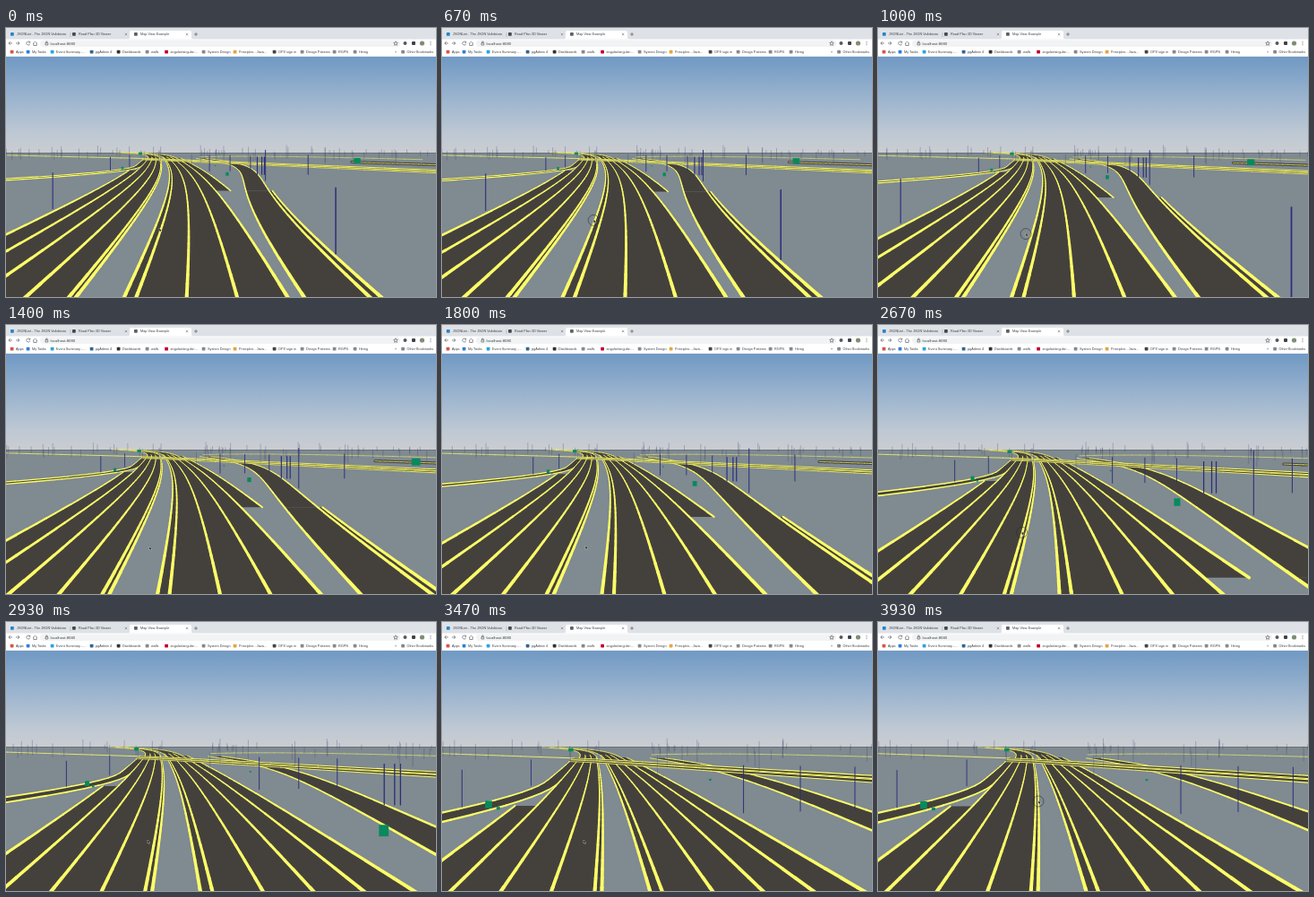
Write an HTML page with a canvas that moves like this. It is 480x300 px and loops after 3.99 s.

```html
<!DOCTYPE html>
<html lang="en">
<head>
<meta charset="utf-8">
<title>Map View Example</title>
<style>
  html, body { margin: 0; width: 100%; height: 100%; overflow: hidden; background: #7f8a91; }
  canvas, svg { position: absolute; left: 0; top: 0; display: block; }
  text { font: 3.8px "Liberation Sans", Arial, sans-serif; fill: #3c4043; }
</style>
</head>
<body>
<canvas id="view" width="480" height="300"></canvas>
<svg id="bar" width="480" height="32" viewBox="0 0 480 32">
  <rect width="480" height="32" fill="#fff"/>
  <rect width="480" height="12.5" fill="#dee1e6"/>
  <path d="M136 12.5q2 0 2-2V5q0-2 2-2h65q2 0 2 2v5.500q0 2 2 2z" fill="#fff"/>
  <path d="M72 5v5" stroke="#9a9da1" stroke-width=".5"/>
  <rect x="38" y="13.500" width="402" height="7.500" rx="3.700" fill="#f1f3f4"/>
  <g fill="none" stroke="#5f6368" stroke-width=".7">
    <path d="M7 17H3m1.800-1.800L3 17l1.800 1.800M11 17h4m-1.800-1.800L15 17l-1.800 1.800M30 17.500l2.500-2.300 2.500 2.300m-4.200-.4v2.400h3.400v-2.400"/>
    <path d="M26.600 16a2 2 0 1 0 .2 1.600m0-2.900v1.500h-1.500"/>
    <path d="M212 5v4m-2-2h4M44 16.700h2.800v2.300H44zm.6 0v-1a.8.8 0 0 1 1.600 0v1"/>
    <path d="M435 14.800l.7 1.500 1.600.2-1.200 1.100.3 1.700-1.400-.8-1.400.8.3-1.700-1.200-1.100 1.600-.2z"/>
  </g>
  <circle cx="445.500" cy="17" r="2" fill="#55595e"/>
  <rect x="453" y="15" width="4" height="4" rx="1" fill="#3f4347"/>
  <circle cx="464.500" cy="17" r="2.600" fill="#7d8f74"/>
  <g fill="#5f6368"><circle cx="474" cy="15.300" r=".5"/><circle cx="474" cy="17" r=".5"/><circle cx="474" cy="18.700" r=".5"/></g>
  <path d="M0 31.700h480" stroke="#d5d7da" stroke-width=".5"/>
</svg>
<script>
const W = 480, H = 300, LOOP = 3990;
const VX = 170, VY = 132, GROUND = 139;
const LANE = 335, MEDIAN = 320, GORE_LEFT = 37.3, GORE_RIGHT = 20.2;
const YELLOW = '#fdfd68', ROAD = '#44413d';
const ctx = document.getElementById('view').getContext('2d');

// ---- browser bar
const svg = document.getElementById('bar');
function add(tag, attrs, text) {
  const el = document.createElementNS('http://www.w3.org/2000/svg', tag);
  for (const k in attrs) el.setAttribute(k, attrs[k]);
  if (text) el.textContent = text;
  svg.append(el);
}
function icon(x, y, color) {
  add('rect', { x, y: y - 2, width: 3.8, height: 3.8, rx: .8, fill: color });
}
[['JSONLint - The JSON Validator', 12, '#2585c7'],
 ['Road Plan 3D Viewer', 81, '#44494f'],
 ['Map View Example', 150, '#5b6167']].forEach(([label, x, color], i) => {
  icon(x - 7, 7, color);
  add('text', { x, y: 8.4 }, label);
  add('path', { d: `M${64.8 + 68 * i} 5.800l2.400 2.400m0-2.400l-2.400 2.400`, stroke: '#5f6368', 'stroke-width': .5 });
});
add('text', { x: 49.5, y: 18.5, style: 'font-size:4.300px' }, 'localhost:8080');
const FOLDER = '#85898e';
[[11, 'Apps', '#d9534a'], [29, 'My Tasks', '#2f7de1'], [56, 'Event Summary -...', '#2aa3e0'],
 [100, 'pgAdmin 4', '#33678f'], [130, 'Dashboards', '#333'], [162, 'walls', FOLDER],
 [183.5, 'angular/angular:...', '#c3002f'], [225, 'System Design', FOLDER], [260, 'Principles - Java...', '#e8a33d'],
 [304, 'OPX sign in', '#444'], [335, 'Design Patterns', FOLDER], [371, 'RGPN', FOLDER],
 [394, 'Hiring', FOLDER], [447.5, 'Other Bookmarks', FOLDER]].forEach(([x, label, color]) => {
  icon(x - 6.3, 26.8, color);
  add('text', { x, y: 28.2 }, label);
});
add('text', { x: 434, y: 28.2 }, '»');

// ---- motion: two drags, each easing to rest
const ease = u => (u = Math.min(1, Math.max(0, u)), u * u * (3 - 2 * u));
const travel = t => 8 * ease((t - 490) / 1320) + 15.7 * ease((t - 2090) / 1450);
const pressed = t => (t >= 530 && t < 1330) || (t >= 2130 && t < 2800) || t >= 3730;

const path = [[0, 171, 224], [530, 171, 208], [1400, 160, 248], [1870, 160, 247],
  [2130, 166, 205], [2930, 158, 244], [3470, 158, 244], [3800, 179, 200]];
function pointer(t) {
  const i = Math.max(1, path.findIndex(p => p[0] > t));
  const [a, b] = t >= 3800 ? [path[7], path[7]] : [path[i - 1], path[i]];
  const u = a === b ? 0 : (t - a[0]) / (b[0] - a[0]);
  return [a[1] + (b[1] - a[1]) * u, a[2] + (b[2] - a[2]) * u];
}

// ---- world: sideways position as a function of depth
const spine = d => 180 - (d < 60 ? .0046 : .009) * Math.abs(60 - d) ** 3;
const left = k => d => spine(d) - k * LANE;
const right = k => d => spine(d) + MEDIAN + 80 + k * LANE;
const median = d => spine(d) + MEDIAN;

const slipTop = d => left(4)(d) - 5.6 * Math.max(0, 46 - d) ** 2.2;
const slipLow = d => slipTop(d + 1) + 330;

const rampL = d => 2300 + 1650 * Math.sin(.052 * (d - 24));
const rampR = d => rampL(d) + 400 + 6 * d;
const shoulder = d => rampR(d) + 75;

// Strips that run across the view: depth as a function of sideways position.
const bridge = drop => x => 72 - drop - x * (x > 0 ? .0029 : .0017);
const loopRoad = x => 90 - ((x - 8700) / 2400) ** 2;
const spur = x => 57 - (x - 12300) * .003;

let seed = 11;
const rand = () => (seed = (seed * 16807) % 2147483647) / 2147483647;

// depth, sideways, height, weight
const poles = [[8.3, 1644, 620, 1], [14.3, -1685, 580, .7], [26, 3110, 900, .6], [31.6, 5285, 700, .6],
  [35.9, 2050, 660, .5], [36.2, 2900, 640, .5], [36.5, 3755, 620, .5], [37, -1980, 560, .5], [43.3, -1390, 580, .4]];
for (const side of [3480, 3640, 3730]) poles.push([31.5, side, 640, 1]);
for (let i = 0; i < 85; i++) {
  const d = 50 + 75 * rand();
  poles.push([d, (rand() * 580 - 220) * d * .95, 500 + 620 * rand() ** 2, 0]);
}
// depth, sideways, drop below eye, width, height
const signs = [[25.5, 1963, 785, 84, 100], [35.7, -1428, 865, 92, 100], [27, 5994, 432, 200, 165],
  [100, -2000, 800, 420, 280], [46.4, 2951, 1000, 60, 50], [36, -1330, 940, 50, 40]];

// ---- drawing
let S = 0;
const project = ([d, x]) => [VX + x / (d - S), VY + 1000 / (d - S)];

function along(f, from, to) {
  const pts = [], near = Math.max(from - S, 5.3), far = to - S;
  if (far <= near) return pts;
  const n = Math.max(2, Math.ceil(Math.log(far / near) / .07));
  for (let i = 0; i <= n; i++) {
    const d = S + near * (far / near) ** (i / n);
    pts.push(project([d, f(d)]));
  }
  return pts;
}
function across(f, from, to) {
  const pts = [];
  for (let i = 0; i <= 24; i++) {
    const x = from + (to - from) * i / 24, d = f(x);
    if (d - S > 1) pts.push(project([d, x]));
  }
  return pts;
}
function fill(a, b) {
  ctx.fillStyle = ROAD;
  ctx.beginPath();
  [...a, ...b.reverse()].forEach(p => ctx.lineTo(p[0], p[1]));
  ctx.fill();
}
function stripe(pts, base = .4, grow = .022, color = YELLOW) {
  ctx.strokeStyle = color;
  for (let i = 1; i < pts.length; i++) {
    const [x0, y0] = pts[i - 1], [x1, y1] = pts[i];
    ctx.lineWidth = base + grow * Math.max(0, (y0 + y1) / 2 - VY);
    ctx.beginPath();
    ctx.moveTo(x0, y0);
    ctx.lineTo(x1, y1);
    ctx.stroke();
  }
}
const surface = (a, b, from, to) => fill(along(a, from, to), along(b, from, to));
const line = (f, from, to) => stripe(along(f, from, to));

const sky = ctx.createLinearGradient(0, 32, 0, GROUND);
sky.addColorStop(0, '#7099c4');
sky.addColorStop(.45, '#9db5cf');
sky.addColorStop(.8, '#bec8d3');
sky.addColorStop(1, '#cacdd2');

function roads() {
  stripe(across(loopRoad, 4000, 20000), .2);
  stripe(across(spur, 12300, 16200), 2, .05, ROAD);
  stripe(across(spur, 12300, 16200), .2);

  surface(slipTop, slipLow, 21, 76);
  line(slipTop, 21, 76);
  line(slipLow, 21, 46);

  surface(rampL, shoulder, 0, GORE_RIGHT);
  surface(rampL, rampR, GORE_RIGHT, 74);
  line(rampL, 0, 74);
  line(rampR, 0, 74);
  line(shoulder, 0, GORE_RIGHT);

  surface(left(3), spine, 0, 150);
  surface(left(4), left(3), 0, GORE_LEFT);
  for (let k = 0; k < 4; k++) line(left(k), 0, k % 3 ? 85 : 150);
  line(left(4), 0, GORE_LEFT);
  line(left(.14), 0, 75);

  surface(median, right(3), 0, 150);
  surface(right(3), right(4), GORE_RIGHT, 76);
  line(median, 0, 150);
  for (let k = 0; k < 4; k++) line(right(k), 0, k < 3 ? 85 : 150);
  line(right(4), GORE_RIGHT, 76);

  fill(across(bridge(0), -1200, 16000), across(bridge(8), -1200, 16000));
  stripe(across(bridge(0), -17000, 16000), .5, .018);
  for (const drop of [3.6, 4.8, 8]) stripe(across(bridge(drop), -1200, 16000), .25, .02);
}

function posts() {
  for (const [d, side, h, weight] of poles) {
    const z = d - S;
    if (z < 4) continue;
    const [x, y] = project([d, side]);
    ctx.strokeStyle = weight ? '#2c2d78' : 'rgba(62,66,104,.5)';
    ctx.lineWidth = .6 + weight * (.4 + 4 / z);
    ctx.beginPath();
    ctx.moveTo(x, y);
    ctx.lineTo(x, y - h / z);
    ctx.stroke();
  }
  ctx.fillStyle = '#078a5e';
  for (const [d, x, drop, w, h] of signs) {
    const z = d - S;
    if (z > 4) ctx.fillRect(VX + (x - w / 2) / z, VY + (drop - h / 2) / z, w / z, h / z);
  }
}

const arrow = new Path2D('M0-1V3L.9 2.200 1.600 3.600 2.200 3.200 1.600 2 2.800 1.900z');
function cursor(t) {
  ctx.save();
  ctx.translate(...pointer(t));
  if (pressed(t)) {
    ctx.strokeStyle = 'rgba(38,38,40,.6)';
    ctx.lineWidth = .9;
    ctx.beginPath();
    ctx.arc(0, 0, 6, 0, 7);
    ctx.stroke();
  }
  ctx.fillStyle = '#111';
  ctx.strokeStyle = '#ddd';
  ctx.lineWidth = .4;
  ctx.fill(arrow);
  ctx.stroke(arrow);
  ctx.restore();
}

function draw(t) {
  S = travel(t);
  ctx.fillStyle = sky;
  ctx.fillRect(0, 0, W, GROUND);
  ctx.fillStyle = '#7f8a91';
  ctx.fillRect(0, GROUND, W, H - GROUND);
  ctx.fillStyle = 'rgba(70,78,84,.45)';
  ctx.fillRect(0, GROUND, W, .8);
  ctx.lineCap = 'round';
  roads();
  ctx.lineCap = 'butt';
  posts();
  cursor(t);
}

// The picture advances fifteen times a second.
const stamp = k => Math.round(k * 20 / 3) * 10;
const start = performance.now();
let shown = -1;
function tick() {
  const t = (performance.now() - start) % LOOP;
  let k = Math.min(59, Math.floor((t + 5) * 3 / 200));
  if (stamp(k) > t) k--;
  if (k !== shown) draw(stamp(shown = k));
  requestAnimationFrame(tick);
}
tick();
</script>
</body>
</html>
```
